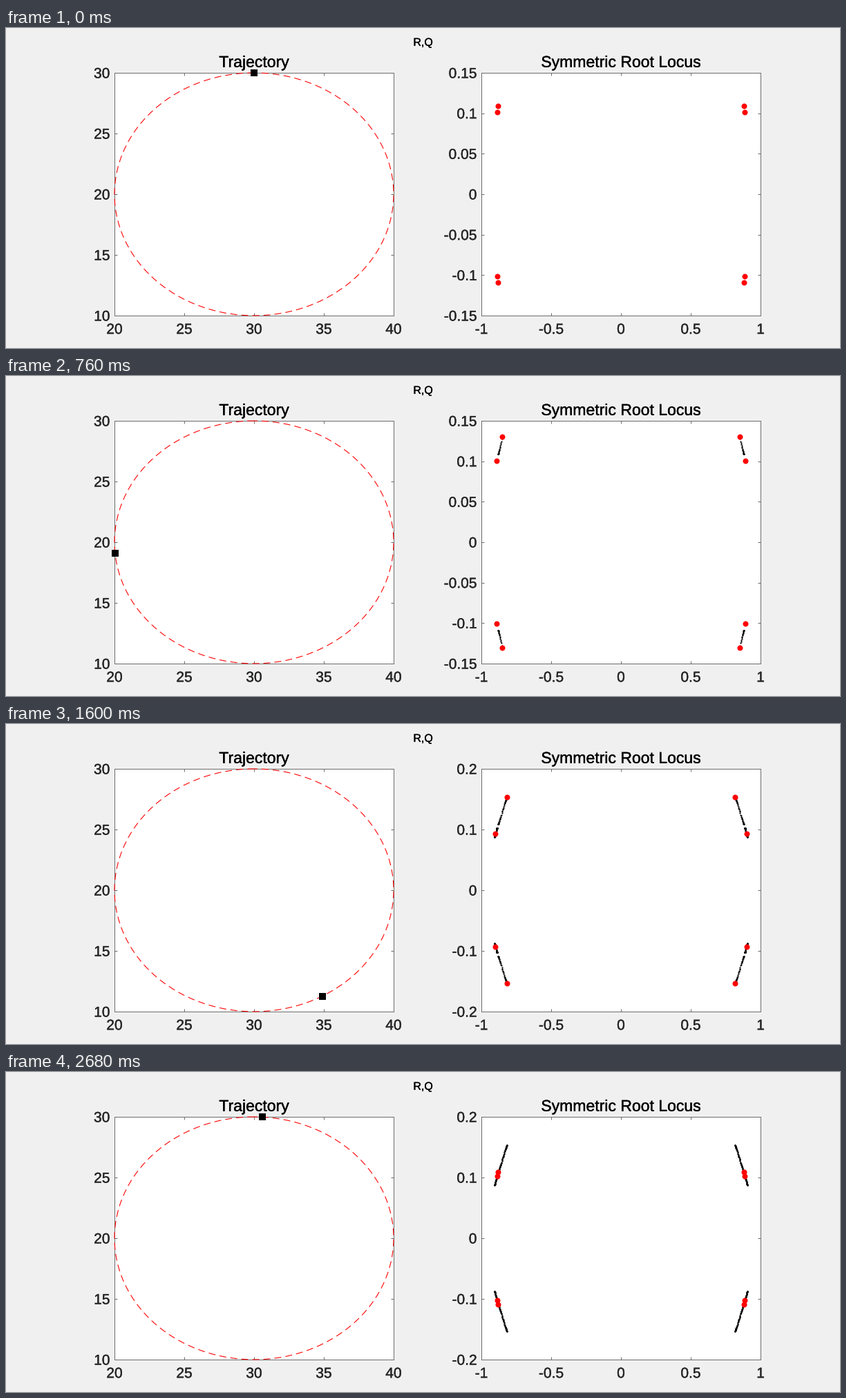
Animation of 1207x464 px, one loop 2.72 s. Source, as a matplotlib script:

```python
import numpy as np
import matplotlib.pyplot as plt
from matplotlib.animation import FuncAnimation
from matplotlib.patheffects import withStroke

W, H, DPI = 1207, 464, 64
PT = 72 / DPI  # points per pixel
FRAMES, INTERVAL = 68, 40
TOP, BOTTOM, MID = 65, 417, 241
LEFT, RIGHT, SIZE = 157, 688, 404
INK, EDGE = "#262626", "#6c6c6c"
STEP = np.radians(4.756)  # turn between two samples

plt.rcParams["font.family"] = "Liberation Sans"
fig = plt.figure(figsize=(W / DPI, H / DPI), dpi=DPI, facecolor="#f0f0f0")
ax = fig.add_axes([0, 0, 1, 1])
ax.set_xlim(0, W)
ax.set_ylim(H, 0)
ax.axis("off")


def label(x, y, text, size, color=INK, ha="center"):
    return ax.text(x, y, text, fontsize=size * PT, color=color, ha=ha, va="baseline",
                   path_effects=[withStroke(linewidth=0.35 * PT, foreground=color)])


def line(xs, ys):
    return ax.plot(xs, ys, color=EDGE, lw=PT, solid_capstyle="butt", zorder=2)[0]


def ticks(lo, hi, step):
    return [f"{v:.3g}" for v in np.arange(round(lo / step), round(hi / step) + 1) * step]


def panel(x0, title, texts):
    x1 = x0 + SIZE
    ax.fill([x0, x1, x1, x0], [TOP, TOP, BOTTOM, BOTTOM], color="white", lw=0, zorder=1)
    line([x0, x1, x1, x0, x0], [TOP, TOP, BOTTOM, BOTTOM, TOP])
    label(x0 + SIZE / 2, 56.7, title, 23, "black")
    for x, text in zip(np.linspace(x0, x1, len(texts)), texts):
        line([x, x], [BOTTOM, BOTTOM - 4])
        line([x, x], [TOP, TOP + 4])
        label(x, 443.3, text, 21)


def y_ticks(x0, texts):
    x1, parts = x0 + SIZE, []
    for y, text in zip(np.linspace(BOTTOM, TOP, len(texts)), texts):
        parts += [line([x0, x0 + 4], [y, y]), line([x1, x1 - 4], [y, y]),
                  label(x0 - 6.5, y + 7.5, text, 21, ha="right")]
    return parts


def turn(k):
    """Angle from the top; past the start, every seventh sample or so is skipped."""
    return STEP * (k + np.maximum(0, (k - 9.46) // 7.19))


def bell(a, center, width):
    return np.exp(-((np.degrees(a) - center) / width) ** 2)


def roots(a):
    """Outer and inner root for each angle, mirrored in both axes."""
    outer = 0.1088 + 0.0202 * (1 - np.cos(a)) + 0.008 * bell(a, 218, 26)
    inner = 0.1018 - 0.014 * bell(a, 174, 52)
    re = np.append(0.879 - 1.374 * (outer - 0.109), 0.8886 - 1.155 * (inner - 0.1018))
    im = np.append(outer, inner)
    return np.concatenate([re, re, -re, -re]), np.concatenate([im, -im, im, -im])


def to_pixels(re, im, limit):
    return RIGHT + SIZE / 2 * (1 + re), MID - im * (BOTTOM - MID) / limit


def orbit(a):
    return LEFT + SIZE / 2 * (1 - np.sin(a)), MID - (MID - TOP) * np.cos(a)


def dots(marker, color, size):
    return ax.plot([], [], marker, color=color, ms=size * PT, mew=0, zorder=4)[0]


label(603.5, 25.8, "R,Q", 16, "black")
panel(LEFT, "Trajectory", ticks(20, 40, 5))
panel(RIGHT, "Symmetric Root Locus", ticks(-1, 1, 0.5))
y_ticks(LEFT, ticks(10, 30, 5))
scales = {0.15: y_ticks(RIGHT, ticks(-0.15, 0.15, 0.05)),
          0.2: y_ticks(RIGHT, ticks(-0.2, 0.2, 0.1))}

ax.plot(*orbit(np.linspace(0, 2 * np.pi, 721)), color="red", lw=1.1 * PT,
        dashes=(10 / 1.1, 6 / 1.1), dash_capstyle="butt", zorder=3)
trail = dots("o", "black", 2.2)
poles = dots("o", "red", 8)
body = dots("s", "black", 10.8)


def update(k):
    re, im = roots(turn(np.arange(k + 1)))
    limit = 0.2 if im.max() > 0.15 else 0.15
    for scale, parts in scales.items():
        for part in parts:
            part.set_visible(scale == limit)
    trail.set_data(*to_pixels(re, im, limit))
    poles.set_data(*to_pixels(*roots(turn(k)), limit))
    x, y = orbit(turn(k))
    body.set_data([x], [y])
    return trail, poles, body


anim = FuncAnimation(fig, update, frames=FRAMES, interval=INTERVAL,
                     init_func=lambda: update(0), repeat=True, repeat_delay=0)
plt.show()
```
